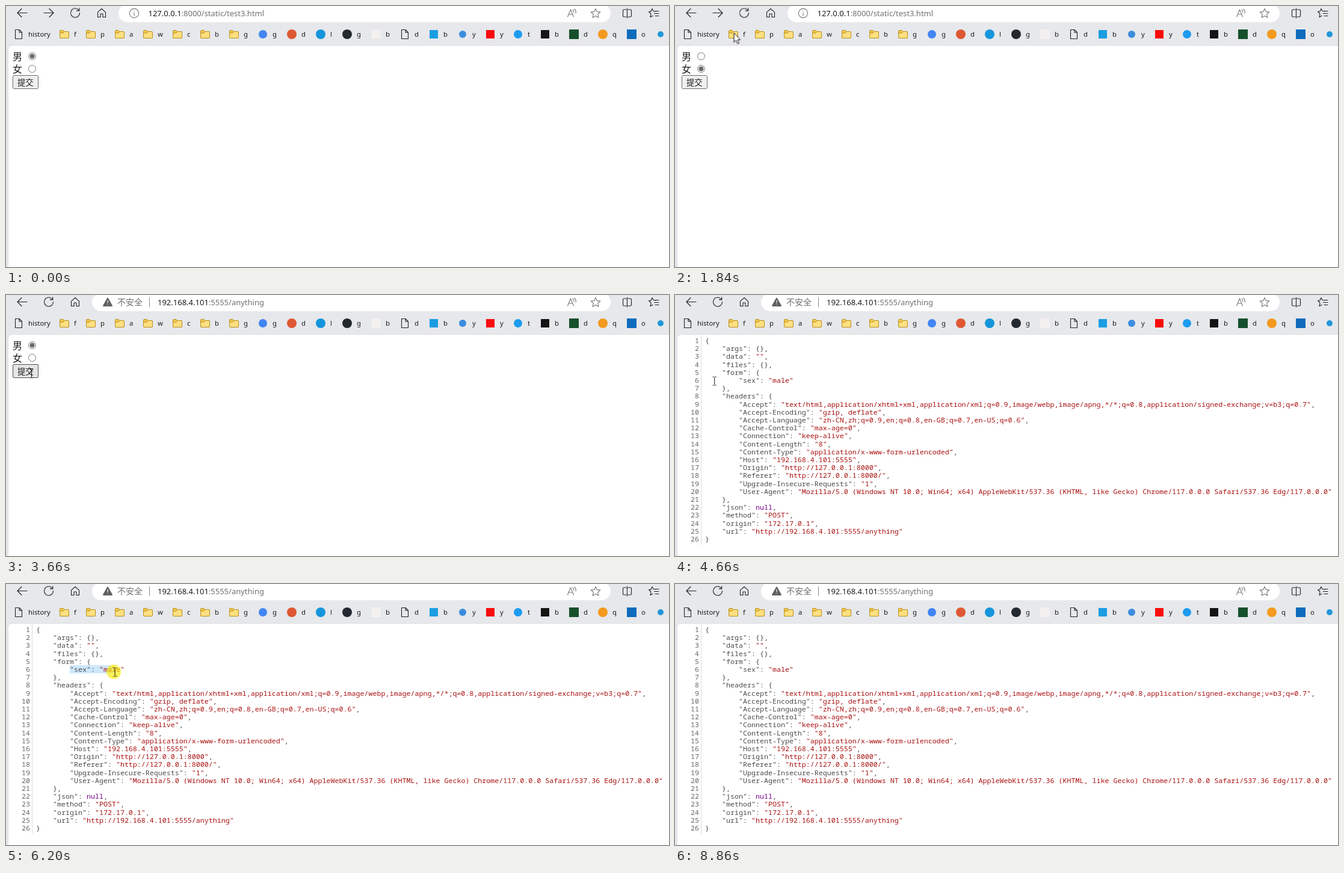
These frames come from a looping animation (1102 px wide and 434 px high, 8.96 s). An HTML page:

```html
<!DOCTYPE html>
<html lang="zh">
<head>
<meta charset="utf-8">
<title>Form test</title>
<style>
html, body { margin: 0; width: 100%; height: 100%; overflow: hidden; background: #e6e8eb; }
svg, pre { position: absolute; left: 0; top: 0; margin: 0; }
text { font-family: "Noto Sans", "Noto Sans CJK SC", sans-serif; fill: #1b1b1b; }
.mark { font-size: 11.3px; }
.url { font-size: 13px; }
.soft { fill: #707070; }
.cjk { font-family: "Noto Sans CJK SC", sans-serif; }
.line { fill: none; stroke: #222; stroke-width: 1.1; stroke-linecap: round; stroke-linejoin: round; }
.grey { stroke: #777; }
.white { stroke: #fff; }

pre { top: 69px; font: 300 11.667px/13.2px "Noto Sans Mono", monospace; color: #4c4c4c; }
#code { left: 50px; }
#nums { width: 40px; text-align: right; color: #666; }
pre i { font-style: normal; color: #a11; }
pre b { font-weight: inherit; color: #708; }

.first, .second, .form, .result, .hover, .load, .idle, .press, .dot,
.select, .caret, .popup, .arrow, .beam, .glow, .cursor {
  animation: 8960ms step-end infinite;
}
.first  { animation-name: first; }
.second { animation-name: second; }
.form   { animation-name: form; }
.result { animation-name: result; }
.hover  { animation-name: hover; }
.load   { animation-name: load; }
.idle   { animation-name: idle; }
.press  { animation-name: press; }
.dot    { animation-name: dot; }
.select { animation-name: select; transform-origin: 106px 0; }
.caret  { animation-name: caret; }
.popup  { animation-name: popup; }
.arrow  { animation-name: arrow; }
.beam   { animation-name: beam; }
.glow   { animation-name: glow; }
.cursor { animation-name: cursor; }

@keyframes first  { 0% { opacity: 1 } 40.84%, 100% { opacity: 0 } }
@keyframes second { 0% { opacity: 0 } 40.84%, 100% { opacity: 1 } }
@keyframes form   { 0% { opacity: 1 } 41.62%, 100% { opacity: 0 } }
@keyframes result { 0% { opacity: 0 } 41.62%, 100% { opacity: 1 } }
@keyframes hover  { 0% { opacity: 0 } 20.7% { opacity: 1 } 30.35%, 100% { opacity: 0 } }
@keyframes load   { 0% { opacity: 0 } 25.11% { opacity: 1 } 29.35% { opacity: 0 } 38.95% { opacity: 1 } 40.84%, 100% { opacity: 0 } }
@keyframes idle   { 0% { opacity: 1 } 25.11% { opacity: 0 } 29.35% { opacity: 1 } 38.95% { opacity: 0 } 40.84%, 100% { opacity: 1 } }
@keyframes press  { 0% { opacity: 0 } 34.6%, 100% { opacity: 1 } }
@keyframes dot    { 0% { transform: none } 14.62% { transform: translateY(21px) } 25.11%, 100% { transform: none } }
@keyframes select {
  0% { transform: scaleX(0) }
  65.95% { transform: scaleX(0); animation-timing-function: steps(5) }
  69.97% { transform: scaleX(1) }
  98.88%, 100% { transform: scaleX(0) }
}
@keyframes caret  { 0% { opacity: 0 } 77% { opacity: 1 } 86.16% { opacity: 0 } 91.74% { opacity: 1 } 98.88%, 100% { opacity: 0 } }
@keyframes popup  { 0% { opacity: 0 } 77% { opacity: 1 } 98.88%, 100% { opacity: 0 } }
@keyframes arrow  { 0% { opacity: 0 } 2.34% { opacity: 1 } 40.84%, 100% { opacity: 0 } }
@keyframes beam   { 0% { opacity: 0 } 40.84% { opacity: 1 } 89.17%, 100% { opacity: 0 } }
@keyframes glow {
  0% { opacity: 0 }
  13.72% { opacity: .55 } 14.62% { opacity: 0 }
  24.1% { opacity: .55 } 25.11% { opacity: 0 }
  38.05% { opacity: .55 } 38.95% { opacity: 0 }
  64.84% { opacity: .65 } 77%, 100% { opacity: 0 }
}
@keyframes cursor {
  0% { transform: translate(942px, 397px) }
  2.34% { transform: translate(942px, 397px); animation-timing-function: steps(4) }
  5.91% { transform: translate(160px, 39px); animation-timing-function: steps(3) }
  8.48% { transform: translate(15px, 98px); animation-timing-function: steps(2) }
  10.26% { transform: translate(42px, 101px) }
  12.05% { transform: translate(44.5px, 103px) }
  14.62% { transform: translate(44.5px, 103px); animation-timing-function: steps(9) }
  22.43% { transform: translate(124px, 15px) }
  29.35% { transform: translate(110.5px, 50px); animation-timing-function: steps(7) }
  35.71% { transform: translate(42px, 129px) }
  40.84% { transform: translate(42px, 130px) }
  49.44% { transform: translate(42px, 130px); animation-timing-function: steps(7) }
  55.8% { transform: translate(123px, 174px); animation-timing-function: steps(5) }
  59.93% { transform: translate(111px, 144px) }
  60.71% { transform: translate(109px, 143px) }
  61.38% { transform: translate(107px, 142px) }
  65.95% { transform: translate(107px, 142px); animation-timing-function: steps(5) }
  69.97% { transform: translate(199px, 147px) }
  71.87% { transform: translate(201px, 147px); animation-timing-function: steps(3) }
  74.44% { transform: translate(205px, 147px) }
  77% { transform: translate(205px, 147px); animation-timing-function: steps(4) }
  80.58% { transform: translate(355px, 213px); animation-timing-function: steps(7) }
  86.49% { transform: translate(1012px, 418px) }
  87.5%, 100% { transform: translate(1020px, 426px) }
}
</style>
</head>
<body>
<svg width="1102" height="434" viewBox="0 0 1102 434">
  <defs>
    <path id="back" class="line" d="M8 0H-7.5M-1 -7L-8 0L-1 7"/>
    <path id="reload" class="line" d="M7.5 0A7.5 7.5 0 1 1 5.4 -5.2L6.6 -4M6.8 -8V-3.6H2.4"/>
    <path id="home" class="line" d="M-6.5 -1.2L0 -7L6.5 -1.2V7H2V1.5H-2V7H-6.5Z"/>
    <path id="star" class="line" d="M0 -7.6L2.3 -2.6L7.8 -2L3.7 1.7L4.8 7.2L0 4.4L-4.8 7.2L-3.7 1.7L-7.8 -2L-2.3 -2.6Z"/>
    <path id="file" class="line" d="M-5.5 -7.5H1L5.5 -3V7.5H-5.5ZM1 -7.5V-3H5.5"/>
    <g id="folder" stroke="#b8901c">
      <path fill="#f3c64d" d="M-7.5 5V-5Q-7.5 -6.5 -6 -6.5H-2L0 -4.5H6Q7.5 -4.5 7.5 -3V5Q7.5 6.5 6 6.5H-6Q-7.5 6.5 -7.5 5Z"/>
      <path fill="#ffdf80" d="M-7.5 5V-2H-2L0 -4.5H6Q7.5 -4.5 7.5 -3V5Q7.5 6.5 6 6.5H-6Q-7.5 6.5 -7.5 5Z"/>
    </g>
  </defs>

  <rect width="1102" height="434" fill="#e6e8eb"/>
  <use href="#back" x="27" y="11.5"/>

  <g class="first">
    <rect class="hover" x="95" y="-5" width="40" height="32" rx="4" fill="#d6d7d9"/>
    <use href="#back" transform="translate(71 11.5) scale(-1 1)"/>
    <use class="idle" href="#reload" x="115" y="11.5"/>
    <path class="line load" d="M109 6L121 18M121 6L109 18"/>
    <use href="#home" x="159" y="11.5"/>
    <rect x="187" y="-3" width="818" height="30" rx="15" fill="#fff"/>
    <circle class="line grey" cx="213" cy="12" r="7.6"/>
    <path class="line grey" d="M213 11V16M213 8V8.2"/>
    <text class="url" x="236.5" y="17">127.0.0.1<tspan class="soft">:8000/static/test3.html</tspan></text>
  </g>

  <g class="second">
    <use href="#reload" x="71" y="11.5"/>
    <use href="#home" x="115" y="11.5"/>
    <rect x="143" y="-3" width="862" height="30" rx="15" fill="#fff"/>
    <path d="M169 5.5L176 18H162Z" fill="#606060" stroke="#606060" stroke-width="2" stroke-linejoin="round"/>
    <path class="line white" d="M169 9V13.5M169 16V16.1"/>
    <text class="cjk soft" x="185" y="17" font-size="14">不安全</text>
    <path d="M238.5 4V20" stroke="#888"/>
    <text class="url" x="252" y="17">192.168.4.101<tspan class="soft">:5555/anything</tspan></text>
  </g>

  <path class="line grey" d="M933.5 18L938.5 6L943.5 18M935.2 14H941.8M942 6Q944.2 8 943.8 11M945 5Q948 8 947 12"/>
  <use href="#star" x="980" y="12" opacity=".62"/>
  <path class="line" d="M1031 6H1027Q1025.5 6 1025.5 7.5V16.5Q1025.5 18 1027 18H1031M1034 6H1038Q1039.5 6 1039.5 7.5V16.5Q1039.5 18 1038 18H1034M1032.5 4V20"/>
  <path class="line" d="M1080 9L1076 8.5L1074 4.5L1072 8.9L1068.5 9.5L1072 13L1071 18.5L1075 16.2M1079 8.5H1085M1077.5 12.5H1085M1079 16.5H1085"/>
  <g id="marks"></g>

  <path d="M3.5 435V73Q3.5 65.5 11 65.5H1103V435Z" fill="#fff" stroke="#dcdee1"/>

  <g class="form">
    <text class="cjk" x="11" y="90" font-size="16">男</text>
    <text class="cjk" x="11" y="111" font-size="16">女</text>
    <g fill="#fff" stroke="#767676">
      <circle cx="43.5" cy="83.5" r="6"/>
      <circle cx="43.5" cy="104.5" r="6"/>
    </g>
    <circle class="dot" cx="43.5" cy="83.5" r="4" fill="#6b6b6b"/>
    <rect x="11.5" y="115.5" width="42" height="22" rx="2" fill="#efefef" stroke="#6a6a6a"/>
    <rect class="press" x="11.5" y="115.5" width="42" height="22" rx="2" fill="#e5e5e5" stroke="#4f4f4f"/>
    <text class="cjk" x="19" y="132" font-size="13.33">提交</text>
  </g>

  <g class="result">
    <path d="M43.5 66V416" stroke="#ddd"/>
    <rect class="select" x="106" y="135" width="91" height="13.5" fill="#cde7fb"/>
  </g>
</svg>

<pre id="nums" class="result"></pre>
<pre id="code" class="result"></pre>

<svg width="1102" height="434" viewBox="0 0 1102 434">
  <rect class="caret" x="196" y="135" width="1" height="13" fill="#000"/>
  <g class="popup">
    <rect x="203" y="99" width="65" height="32" rx="6.5" fill="#fb584c"/>
    <path class="line white" d="M215 107H211.5V111M223 107H226.5V111M215 123H211.5V119M223 123H226.5V119"/>
    <text x="219" y="118.3" text-anchor="middle" style="font-size:9px;font-weight:600;fill:#fff">AI</text>
    <path d="M235.5 108V122" stroke="#fff" opacity=".6"/>
    <path class="line white" d="M256 119L259 122M257.5 114.5A6.3 6.3 0 1 1 244.9 114.5A6.3 6.3 0 1 1 257.5 114.5"/>
  </g>
  <g class="cursor">
    <circle class="glow" cx="-1.5" cy="0" r="12" fill="#fbe900"/>
    <path class="arrow" d="M.5 .5V16L4 12.7L6.5 18.5L9 17.4L6.5 11.8H11.2Z" fill="#fff" stroke="#111"/>
    <path class="beam" d="M-2.5 -6.5H-.5L.5 -5.5L1.5 -6.5H3.5M.5 -5.5V6.5M-2.5 7.5H-.5L.5 6.5L1.5 7.5H3.5" fill="none" stroke="#111"/>
  </g>
</svg>

<script>
// Bookmarks: icon centre, label, icon kind, colour, radius
const marks = [
  [21, "history", "file"],
  ...[[97, "f"], [141, "p"], [189, "a"], [236, "w"], [285, "c"], [331, "b"], [379, "g"]].map(m => [...m, "folder"]),
  [427, "g", "circle", "#4285f4", 7],
  [475, "d", "circle", "#de5833"],
  [523, "l", "circle", "#1595dc"],
  [567, "g", "circle", "#24292f"],
  [615, "b", "square", "#f4f0f0"],
  [663, "d", "file"],
  [711, "b", "square", "#1b9de2", 7],
  [759, "y", "circle", "#3c8ddd", 6],
  [805, "y", "square", "#f80c0c", 7],
  [851, "t", "circle", "#1d9bf0", 7],
  [896, "b", "square", "#151515", 7],
  [944, "d", "square", "#17502c"],
  [992, "q", "circle", "#f39a1f"],
  [1040, "o", "square", "#0f6cbd"],
  [1088, "", "circle", "#2097da", 5]
];

function icon(x, kind, color, r = 8) {
  if (kind === "circle") return `<circle cx="${x}" cy="47" r="${r}" fill="${color}"/>`;
  if (kind === "square") return `<rect x="${x - r}" y="${47 - r}" width="${2 * r}" height="${2 * r}" fill="${color}"/>`;
  return `<use href="#${kind}" x="${x}" y="47"/>`;
}

document.getElementById("marks").innerHTML = marks.map(([x, label, ...look]) =>
  icon(x, ...look) + `<text class="mark" x="${x + 16}" y="51">${label}</text>`).join("");

const reply = {
  args: {},
  data: "",
  files: {},
  form: { sex: "male" },
  headers: {
    "Accept": "text/html,application/xhtml+xml,application/xml;q=0.9,image/webp,image/apng,*/*;q=0.8,application/signed-exchange;v=b3;q=0.7",
    "Accept-Encoding": "gzip, deflate",
    "Accept-Language": "zh-CN,zh;q=0.9,en;q=0.8,en-GB;q=0.7,en-US;q=0.6",
    "Cache-Control": "max-age=0",
    "Connection": "keep-alive",
    "Content-Length": "8",
    "Content-Type": "application/x-www-form-urlencoded",
    "Host": "192.168.4.101:5555",
    "Origin": "http://127.0.0.1:8000",
    "Referer": "http://127.0.0.1:8000/",
    "Upgrade-Insecure-Requests": "1",
    "User-Agent": "Mozilla/5.0 (Windows NT 10.0; Win64; x64) AppleWebKit/537.36 (KHTML, like Gecko) Chrome/117.0.0.0 Safari/537.36 Edg/117.0.0.0"
  },
  json: null,
  method: "POST",
  origin: "172.17.0.1",
  url: "http://192.168.4.101:5555/anything"
};

const source = JSON.stringify(reply, null, 4);
document.getElementById("code").innerHTML = source
  .replace(/: (".*")(,?)$/gm, ": <i>$1</i>$2")
  .replace(/: null/g, ": <b>null</b>");
document.getElementById("nums").textContent = source.split("\n").map((_, i) => i + 1).join("\n");
</script>
</body>
</html>
```
